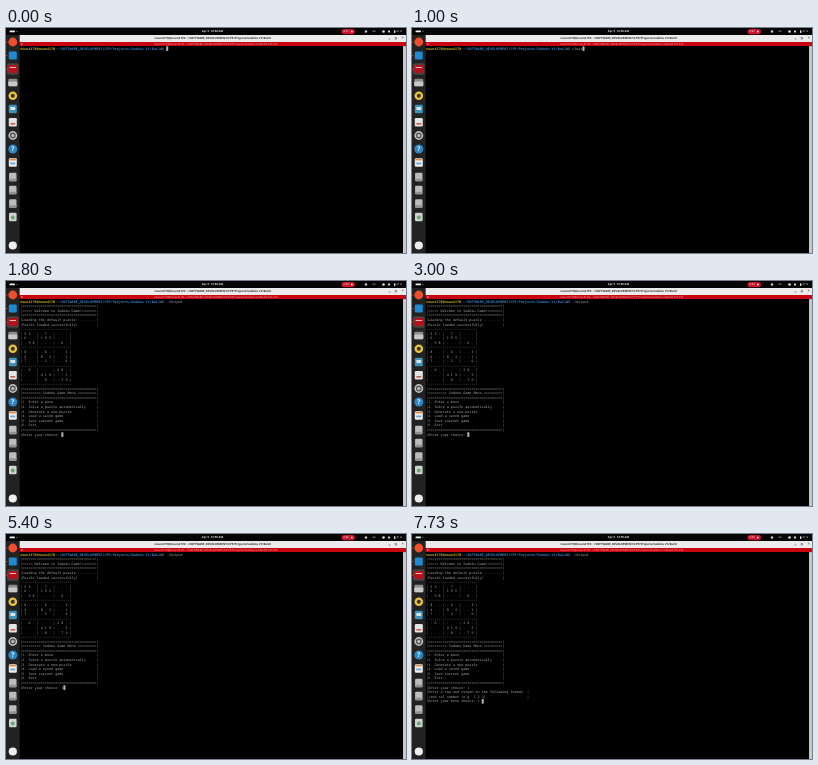
An HTML page with a canvas for the animation above (8 s loop, 400 by 225 pixels).

```html
<!DOCTYPE html>
<html lang="en">
<head>
<meta charset="utf-8">
<title>Sudoku in a terminal</title>
<style>
html, body { margin: 0; width: 100%; height: 100%; overflow: hidden; background: #000; }
canvas { display: block; width: 100vw; height: 100vh; }
</style>
</head>
<body>
<canvas id="stage"></canvas>
<script>
const W = 400, H = 225, LOOP = 8000;
const canvas = document.getElementById('stage');
const ctx = canvas.getContext('2d');
const SANS = '"Noto Sans", sans-serif', MONO = '"Noto Sans Mono", monospace';

// Terminal grid
const LEFT = 14.2, TOP = 20.6, CELL = 2.056, LINE = 4.586;
const GREY = '#aaaaaa', GOLD = '#c9ae16', BLUE = '#3f7fc0';

const USER = 'noun4170@noun4170';
const PATH = '~/SOFTWARE_DEVELOPMENT/CPP/Projects/Sudoku V1/Build';
const PROMPT_LENGTH = USER.length + PATH.length + 3;

const boxed = (s, width = 38) => ('|' + s).padEnd(width - 1) + '|';
const rule = boxed('='.repeat(36));
const puzzle = ['53..7....', '6..195...', '.98....6.', '8...6...3', '4..8.3..1',
                '7...2...6', '.6....28.', '...419..5', '....8..79'];
const puzzleRow = row => '| ' + row.match(/.../g).map(b => [...b].join(' ')).join(' | ') + ' |';
const separator = '-'.repeat(25);
const puzzleLines = puzzle.flatMap((row, i) => i % 3 ? [puzzleRow(row)] : [separator, puzzleRow(row)]);

const menu = [
  rule,
  boxed('===== Welcome to Sudoku Game!======='),
  rule,
  boxed('Loading the default puzzle .........'),
  boxed('Puzzle loaded successfully!'),
  ...puzzleLines, separator,
  rule,
  boxed('========= Sudoku Game Menu ========='),
  rule,
  ...['Enter a move', 'Solve a puzzle automatically', 'Generate a new puzzle',
      'Load a saved game', 'Save current game', 'Exit'].map((s, i) => boxed(`${i + 1}. ${s}`)),
  rule
];
const CHOICE = '|Enter your choice: ';
const moveHelp = [
  boxed('Enter a row and column in the following format:', 50),
  boxed('(row col number (e.g. 1 2 3)', 50)
];
const MOVE = '|Enter your move choice: ';

// [start ms, command, program output, cursor visible]
const withMove = typed => [...menu, CHOICE + '1', ...moveHelp, MOVE + typed];
const withChoice = typed => [...menu, CHOICE + typed];
const states = [
  [0, '', [], true],
  [330, '', [], false],
  [930, '', [], true],
  [1000, 'clear', [], true],
  [1330, './Output', [], true],
  [1730, './Output', withChoice(''), true],
  [2400, './Output', withChoice(''), false],
  [3000, './Output', withChoice(''), true],
  [3600, './Output', withChoice('1'), true],
  [3670, './Output', withChoice('1 '), true],
  [4200, './Output', withChoice('1 '), false],
  [4800, './Output', withChoice('1 '), true],
  [5400, './Output', withChoice('1'), true],
  [5670, './Output', withMove(''), true],
  [6330, './Output', withMove(''), false],
  [6930, './Output', withMove(''), true],
  [7130, './Output', withMove('1'), true],
  [7600, './Output', withMove('1 '), true]
];

function rect(x, y, w, h, color, radius = 0) {
  ctx.fillStyle = color;
  ctx.beginPath();
  ctx.roundRect(x, y, w, h, radius);
  ctx.fill();
}

function disc(x, y, r, color) {
  ctx.fillStyle = color;
  ctx.beginPath();
  ctx.arc(x, y, r, 0, 7);
  ctx.fill();
}

// Sets type at ten times the size and scales down, to keep fractional advances.
function text(s, x, y, size, color, { font = SANS, weight = 400, align = 'left' } = {}) {
  ctx.save();
  ctx.translate(x, y);
  ctx.scale(0.1, 0.1);
  ctx.font = `${weight} ${size * 10}px ${font}`;
  ctx.textAlign = align;
  ctx.textBaseline = 'middle';
  ctx.textRendering = 'geometricPrecision';
  ctx.fillStyle = color;
  ctx.fillText(s, 0, 0);
  ctx.restore();
}

const cellX = column => LEFT + column * CELL;
const rowY = row => TOP + row * LINE;
function print(s, column, row, color = GREY, weight = 400) {
  text(s, cellX(column), rowY(row), CELL / 0.6, color, { font: MONO, weight });
}

function drawTopBar(t) {
  rect(0, 0, W, 7, '#050505');
  rect(3.5, 2.6, 5.5, 1.7, '#eeeeee', 0.85);
  disc(11, 3.4, 0.6, '#777777');
  text('Apr 5  12:50 AM', 206.5, 3.2, 2.8, '#e0e0e0', { weight: 600, align: 'center' });
  rect(335.5, 0.9, 13.5, 5.4, '#c7162b', 2.7);
  const seconds = 1 + Math.max(0, Math.floor((t + 300) / 1000));
  text('0:0' + seconds, 337.6, 3.5, 2.6, '#ffffff');
  rect(345, 2.7, 1.6, 1.6, '#ffffff', 0.3);
  disc(360, 3.5, 1.2, '#cccccc');
  text('en', 366.4, 3.4, 2.8, '#dddddd');
  disc(377.5, 3.5, 1.3, '#dddddd');
  rect(382, 2.5, 2, 2, '#dddddd', 0.4);
  rect(388, 2.3, 1.4, 2.6, '#dddddd', 0.3);
  text('41 %', 390.4, 3.4, 2.6, '#dddddd');
}

function drawDock() {
  rect(0, 7, 13.5, H - 7, '#222222');
  rect(1, 35.2, 11.6, 11.6, '#444444', 2);
  for (const y of [14, 27.5, 41]) disc(0.8, y, 0.6, '#e95420');
  const X = 6.8;
  const tile = (y, color, w = 8, h = 8) => rect(X - w / 2, y - h / 2, w, h, color, 1.2);

  disc(X, 14, 4.4, '#f04e2c');
  tile(27.5, '#1f8ad2');
  tile(41, '#b5121b', 9, 8);
  rect(3.6, 39, 6.4, 1, '#e6b8b8');
  tile(54.5, '#8c8c8c', 9, 7.5);
  rect(2.3, 53.4, 9, 4.9, '#c8c8c8', 1);
  disc(X, 67.8, 4.3, '#e8c440');
  disc(X, 67.8, 2, '#3a3420');
  tile(81, '#3f93bb', 8, 8.4);
  rect(4.4, 79, 4.8, 3, '#d4e6ee', 0.5);
  tile(94.3, '#e4e4e4', 8, 8.4);
  rect(4.4, 95, 4.8, 1.6, '#c9604a');
  disc(X, 107.5, 4.4, '#c4c4c4');
  disc(X, 107.5, 2.9, '#555555');
  disc(X, 107.5, 1.5, '#c4c4c4');
  disc(X, 121, 4.5, '#2c87c8');
  text('?', X, 121, 6.5, '#ffffff', { weight: 700, align: 'center' });
  tile(134.5, '#ececec', 8, 8.6);
  rect(3.4, 131, 6.8, 1.4, '#e58a3a');
  rect(4.2, 134.6, 5, 1.7, '#6fa4cf');
  for (const y of [149, 162, 175.5]) {
    tile(y, '#bcbcbc', 7.4, 8.6);
    rect(3.1, y + 1.7, 7.4, 2.6, '#929292', 0.8);
  }
  tile(189, '#d0d4ce', 7.6, 8.6);
  disc(X, 189.5, 2, '#68a878');
  disc(X, 217.5, 4.1, '#eeeeee');
}

function drawWindow() {
  rect(13.5, 7, W - 13.5, 7, '#ebebeb');
  text(`${USER}: ${PATH}`, 206.7, 10.3, 2.86, '#303030', { weight: 700, align: 'center' });
  rect(382.6, 10.7, 1.8, 0.6, '#555555');
  rect(388.8, 9.3, 2, 2, '#555555');
  rect(389.3, 9.8, 1, 1, '#ebebeb');
  text('×', 396.6, 10.2, 4.2, '#444444', { align: 'center' });
  rect(13.5, 14, W - 13.5, 4.1, '#c80510');
  text(`${USER}: ${PATH} 191x52`, 209.7, 15.9, 2.9, '#e3a5a8', { align: 'center' });
  rect(15, 15.2, 1.5, 1.5, '#dc8588');
  rect(13.5, 18.1, W - 13.5, H - 18.1, '#000000');
  rect(397, 18.1, 3, H - 18.1, '#c8c8c8');
}

function drawTerminal(t) {
  const [, command, output, cursorOn] = states.findLast(([start]) => t >= start);
  print(USER, 0, 0, GOLD, 700);
  print(':', USER.length, 0);
  print(PATH, USER.length + 1, 0, BLUE, 600);
  print('$ ' + command, PROMPT_LENGTH - 2, 0);
  output.forEach((line, i) => print(line, 0, i + 1));
  if (cursorOn) {
    const column = output.length ? output.at(-1).length : PROMPT_LENGTH + command.length;
    rect(cellX(column), rowY(output.length) - LINE / 2, CELL, LINE, '#b4b4b4');
  }
}

function frame() {
  const t = performance.now() % LOOP;
  const ratio = window.devicePixelRatio || 1;
  const width = Math.round(innerWidth * ratio), height = Math.round(innerHeight * ratio);
  if (canvas.width !== width || canvas.height !== height) {
    canvas.width = width;
    canvas.height = height;
  }
  ctx.setTransform(width / W, 0, 0, height / H, 0, 0);
  drawWindow();
  drawTopBar(t);
  drawDock();
  drawTerminal(t);
  requestAnimationFrame(frame);
}
frame();
</script>
</body>
</html>
```
